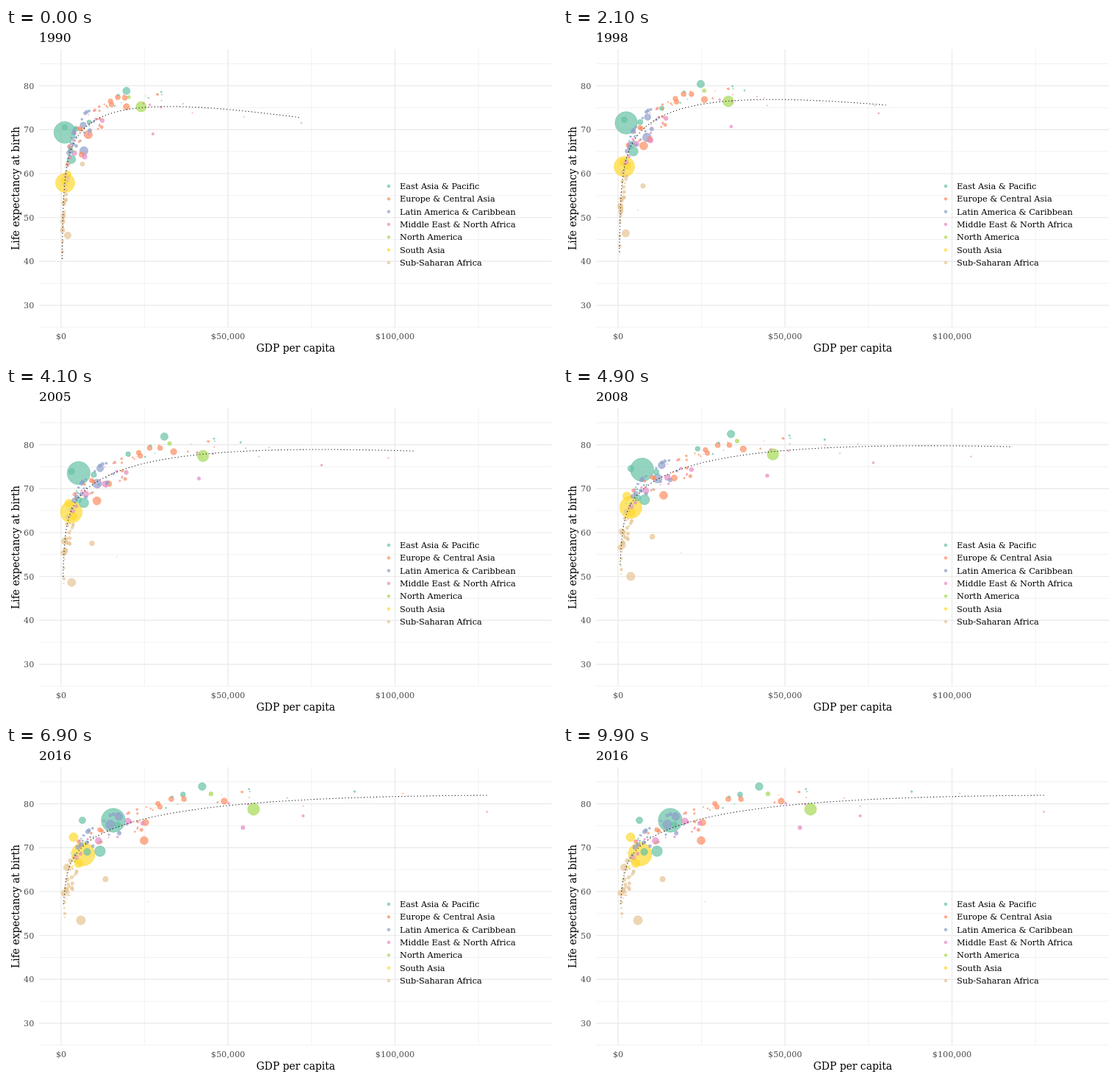
Write an HTML page that moves like this. It is 750 px wide and 450 px high and loops after 10 s.

```html
<!DOCTYPE html>
<html lang="en">
<head>
<meta charset="utf-8">
<title>Life expectancy and GDP</title>
<style>
html, body { margin: 0; width: 100%; height: 100%; overflow: hidden; background: #fff; }
svg { display: block; width: 750px; height: 450px; font-family: "DejaVu Serif", serif; font-variant-ligatures: none; }
.tick { font-size: 11.2px; fill: #4d4d4d; }
.key { font-size: 11.3px; }
.axis { font-size: 13.9px; text-anchor: middle; }
.dots circle { fill-opacity: .7; stroke-opacity: .7; stroke-width: .7; }
</style>
</head>
<body>
<svg id="stage" viewBox="0 0 750 450"></svg>
<script>
const STEP = 100, LOOP = 10000, MID = 29, LAST = 69, X0 = 75;
const stage = document.getElementById('stage');

function el(tag, attrs, parent = stage, text = '') {
  const node = document.createElementNS('http://www.w3.org/2000/svg', tag);
  for (const k in attrs) node.setAttribute(k, attrs[k]);
  node.textContent = text;
  parent.appendChild(node);
  return node;
}

// Grid, axes and legend
const gridLine = (d, width) => el('path', { d, stroke: '#ebebeb', 'stroke-width': width });
const hLine = (y, width) => gridLine(`M45 ${y}H743`, width);
const vLine = (x, width) => gridLine(`M${x} 29V407`, width);
const lifeY = years => 78.5 + (80 - years) * 5.97;
const cashX = thousands => X0 + thousands * 4.545;

for (let v = 25; v <= 85; v += 10) hLine(lifeY(v), .68);
for (let v = 25; v <= 125; v += 50) vLine(cashX(v), .68);
for (let v = 30; v <= 80; v += 10) {
  hLine(lifeY(v), 1.36);
  el('text', { x: 38.3, y: lifeY(v) + 4.1, class: 'tick', 'text-anchor': 'end' }, stage, v);
}
for (let v = 0; v <= 100; v += 50) {
  vLine(cashX(v), 1.36);
  el('text', { x: cashX(v), y: 423, class: 'tick', 'text-anchor': 'middle' }, stage, v ? `$${v},000` : '$0');
}
el('text', { x: 394.4, y: 440, class: 'axis' }, stage, 'GDP per capita');
el('text', { transform: 'translate(18 218) rotate(-90)', class: 'axis' }, stage, 'Life expectancy at birth');
const title = el('text', { x: 45, y: 19, 'font-size': 17.2 });

const [TEAL, ORANGE, BLUE, PINK, GREEN, YELLOW, TAN] =
  ['#66c2a5', '#fc8d62', '#8da0cb', '#e78ac3', '#a6d854', '#ffd92f', '#e5c494'];
const dots = el('g', { class: 'dots' });
[['East Asia & Pacific', TEAL], ['Europe & Central Asia', ORANGE], ['Latin America & Caribbean', BLUE],
 ['Middle East & North Africa', PINK], ['North America', GREEN], ['South Asia', YELLOW],
 ['Sub-Saharan Africa', TAN]].forEach(([name, color], i) => {
  const y = 215 + i * 17.33;
  el('circle', { cx: 520.9, cy: y, r: 1.9, fill: color, stroke: color }, dots);
  el('text', { x: 536, y: y + 4, class: 'key' }, stage, name);
});

// Motion
const mix = (a, b, t) => a + (b - a) * t;

function between(keys, frame) {
  let i = 0;
  while (i < keys.length - 2 && frame > keys[i + 1]) i++;
  return [i, (frame - keys[i]) / (keys[i + 1] - keys[i])];
}

// Trend: first and last distance from $0, then heights evenly spaced in log distance
const TREND_KEYS = [0, 13, MID, 56, LAST];
const TREND = [
  [1.4, 327, 314, 205, 149, 112, 122],
  [1.5, 337, 326, 210, 150, 108.5, 114],
  [2, 397, 283, 192, 145, 106, 96],
  [3.3, 586, 227, 168, 130.5, 93, 76],
  [3.5, 580, 215, 161, 125, 89.5, 67]
];

function trendAt(frame) {
  const [i, t] = between(TREND_KEYS, frame);
  return TREND[i].map((a, k) => mix(a, TREND[i + 1][k], t));
}

function trendPoint([near, far, ...heights], u) {
  const s = u * 4;
  let y = 0;
  heights.forEach((h, i) => {
    for (let j = 0; j < 5; j++) if (j !== i) h *= (s - j) / (i - j);
    y += h;
  });
  return [X0 + near * (far / near) ** u, y];
}

const bubbles = [];
function addBubble(color, radius, place) {
  bubbles.push({ radius, place, node: el('circle', { fill: color, stroke: color }, dots) });
}

// Incomes grow at a steady rate, life expectancy by steady steps
function country(color, r0, r1, ...points) {
  const keys = points.length === 3 ? [0, MID, LAST] : [0, LAST];
  addBubble(color, frame => mix(r0, r1, frame / LAST), frame => {
    const [i, t] = between(keys, frame);
    const [xa, ya] = points[i], [xb, yb] = points[i + 1];
    return [X0 + (xa - X0) * ((xb - X0) / (xa - X0)) ** t, mix(ya, yb, t)];
  });
}

// Smaller countries keep their place relative to the trend
let seed = 11;
const rand = () => (seed = seed * 16807 % 2147483647) / 2147483647;
function cloud(color, count, [uMin, uMax], [yMin, yMax], [rMin, rMax]) {
  for (let i = 0; i < count; i++) {
    const u = mix(uMin, uMax, rand()), dy = mix(yMin, yMax, rand()), r = mix(rMin, rMax, rand() ** 2);
    addBubble(color, () => r, (frame, trend) => {
      const [x, y] = trendPoint(trend, u);
      return [x, y + dy];
    });
  }
}

country(TEAL, 15.2, 16.7, [80, 142], [90, 124], [146, 101]);
country(YELLOW, 13.4, 16.4, [80.5, 210.5], [85, 180], [105, 147]);
country(GREEN, 7.4, 8.5, [184, 107], [244.5, 97], [337, 86]);
country(TEAL, 6.2, 7.6, [89, 178.5], [128, 143]);
country(BLUE, 6, 6.8, [106, 167], [142, 107]);
country(ORANGE, 5.9, 5.8, [112, 145], [109, 166], [188, 128.5]);
country(TAN, 5, 6.5, [84, 282], [86, 278], [102, 237]);
country(TEAL, 5.4, 5.6, [164, 85.5], [267, 55]);
country(BLUE, 4.4, 5.5, [105, 132], [153.5, 96]);
country(YELLOW, 5, 6.2, [84, 199], [99, 159.5]);
country(YELLOW, 5, 6.4, [80, 208], [92, 124]);
country(TAN, 3.5, 5, [77, 275], [83, 165]);
country(TAN, 3.2, 4.5, [77.5, 263], [79, 200]);
country(ORANGE, 4.6, 4.6, [164, 107], [297, 75]);
country(ORANGE, 4, 4.7, [103, 172], [190, 104]);
country(PINK, 3.7, 4.5, [107, 175], [166, 102]);
country(PINK, 3.7, 4.9, [93, 170], [126, 129]);
country(TAN, 3.3, 4, [104, 185], [111, 226], [135.5, 181]);
country(TEAL, 4, 4.9, [80, 135], [104, 101]);
country(TEAL, 3.9, 5.1, [88, 167], [110.5, 144]);
country(TEAL, 3.9, 4.2, [95, 137], [152, 107]);
country(TEAL, 3.3, 3.8, [113, 128], [241, 66]);
country(PINK, 2, 3, [200, 144], [322.5, 111]);
country(GREEN, 2.7, 3.2, [167, 94], [279, 65]);
country(PINK, 1.2, 2, [402, 129], [441, 111], [404.5, 95]);
country(PINK, .9, 1.3, [324, 121], [473, 99.5], [654.5, 89.5]);
country(TAN, .8, .9, [78, 270], [137.5, 239], [193.5, 211.5]);
country(TEAL, 1.2, 1.7, [194, 95], [474.5, 62]);
country(ORANGE, .8, 1, [212, 108], [540, 64.5]);

const SMALL = [.7, 2], MEDIUM = [1, 3.5], LARGE = [3.5, 4.2];
cloud(ORANGE, 4, [.71, .8], [-22, -10], LARGE);
cloud(ORANGE, 14, [.66, .84], [-22, -5], SMALL);
cloud(ORANGE, 16, [.36, .68], [-14, 14], MEDIUM);
cloud(TEAL, 5, [.7, .86], [-24, -8], SMALL);
cloud(TEAL, 12, [.25, .55], [-16, 12], SMALL);
cloud(BLUE, 20, [.34, .66], [-20, 10], MEDIUM);
cloud(PINK, 13, [.32, .68], [-14, 14], MEDIUM);
cloud(PINK, 4, [.8, .95], [-4, 20], SMALL);
cloud(YELLOW, 4, [.18, .45], [-12, 10], MEDIUM);
cloud(TAN, 36, [.04, .36], [-6, 42], MEDIUM);

const trendLine = el('path', { fill: 'none', stroke: '#000', 'stroke-width': 1.07, 'stroke-dasharray': '1.07 3.2' });

function draw(time) {
  const frame = Math.min(LAST, Math.floor(time % LOOP / STEP));
  const trend = trendAt(frame);
  title.textContent = Math.round(1990 + 26 * frame / LAST);
  for (const { node, radius, place } of bubbles) {
    const [x, y] = place(frame, trend);
    node.setAttribute('cx', x.toFixed(2));
    node.setAttribute('cy', y.toFixed(2));
    node.setAttribute('r', (radius(frame) - .35).toFixed(2));
  }
  const line = Array.from({ length: 101 }, (_, i) => trendPoint(trend, i / 100).map(v => v.toFixed(2)));
  trendLine.setAttribute('d', 'M' + line.join('L'));
}

const start = performance.now();
function tick() {
  draw(performance.now() - start);
  requestAnimationFrame(tick);
}
tick();
</script>
</body>
</html>
```
